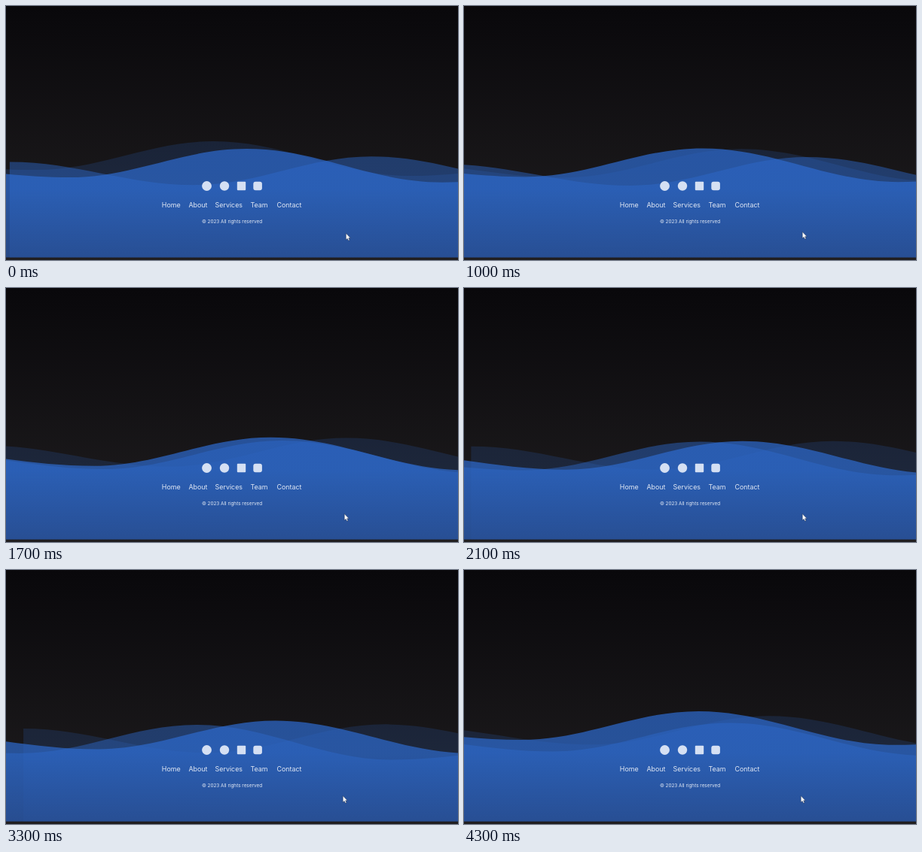
Write an HTML page that moves like this. It is 600x338 px and loops after 4400 ms.

```html
<!DOCTYPE html>
<html lang="en">
<head>
<meta charset="utf-8">
<title>Wave footer</title>
<style>
  html, body { margin: 0; width: 100%; height: 100%; overflow: hidden; background: #141314; }
  svg { display: block; width: 100vw; height: 100vh; }
  text { font-family: Inter, "Open Sans", sans-serif; text-anchor: middle; fill: #e2e9f5; }
  .links { font-size: 8.9px; }
  .note { font-size: 6.4px; }
  .icons { fill: #d5e0f3; }
</style>
</head>
<body>
<svg viewBox="0 0 600 338" preserveAspectRatio="none">
  <defs>
    <linearGradient id="night" x2="0" y2="1">
      <stop stop-color="#09080b"/>
      <stop offset="1" stop-color="#201e20"/>
    </linearGradient>
    <linearGradient id="water" gradientUnits="userSpaceOnUse" x1="0" y1="195" x2="0" y2="334">
      <stop stop-color="#2d6acf"/>
      <stop offset=".35" stop-color="#2d69cb"/>
      <stop offset="1" stop-color="#2956a5"/>
    </linearGradient>
  </defs>
  <rect width="600" height="338" fill="url(#night)"/>
  <g id="waves" fill="url(#water)"></g>
  <g class="icons">
    <circle cx="266.5" cy="239.5" r="6.4"/>
    <circle cx="290" cy="239.5" r="6.2"/>
    <rect x="306.8" y="233.8" width="11.4" height="11.4" rx="1"/>
    <rect x="328.3" y="233.7" width="11.6" height="11.6" rx="3"/>
  </g>
  <g class="links">
    <text x="219.3" y="268.2">Home</text>
    <text x="255" y="268.2">About</text>
    <text x="295.8" y="268.2">Services</text>
    <text x="336" y="268.2">Team</text>
    <text x="376" y="268.2">Contact</text>
  </g>
  <text class="note" x="300" y="289.2">© 2023 All rights reserved</text>
  <path id="cursor" d="M0 0V8.6L2 6.9L3.4 9.8L4.8 9.1L3.5 6.3H6Z" fill="#fff" stroke="#1c2c4c" stroke-width=".5"/>
</svg>
<script>
const LOOP = 4400, STEP = 100, FLOOR = 334.6;

// The crest of each wave swings between two places; "rest" is when it is at the first.
const waves = [
  { alpha: .18, period: 6400, rest: -400, from: [266, 179], to: [518, 207] },
  { alpha: .46, period: 5500, rest: 300, from: [492, 200], to: [248, 206] },
  { alpha: .71, period: 4060, rest: 530, from: [308, 187], to: [378, 206] }
];

const lerp = (a, b, k) => a + (b - a) * k;
const swing = (t, { period, rest }) => (1 - Math.cos(2 * Math.PI * (t - rest) / period)) / 2;

// Crests and troughs around the main crest; the sides rise as it moves right.
function profile(x, y) {
  const shift = x - 275;
  return [
    [x - 480, y + 24 - shift * .08],
    [x - 235, y + 38],
    [x, y],
    [x + 260, y + 46 - shift * .03],
    [x + 520, y + 24]
  ];
}

function wavePath(points) {
  let d = `M${points[0]}`;
  for (let i = 1; i < points.length; i++) {
    const [x0, y0] = points[i - 1], [x1, y1] = points[i];
    const pull = (x1 - x0) * .364;
    d += `C${x0 + pull},${y0} ${x1 - pull},${y1} ${x1},${y1}`;
  }
  return `${d}V${FLOOR}H${points[0][0]}Z`;
}

const group = document.getElementById("waves");
const cursor = document.getElementById("cursor");
for (const wave of waves) {
  wave.node = document.createElementNS(group.namespaceURI, "path");
  wave.node.setAttribute("fill-opacity", wave.alpha);
  group.append(wave.node);
}

function draw(t) {
  for (const wave of waves) {
    const k = swing(t, wave);
    const [x, y] = wave.from.map((start, i) => lerp(start, wave.to[i], k));
    wave.node.setAttribute("d", wavePath(profile(x, y)));
  }
  const settle = Math.min(t / 400, 1);
  const x = lerp(451.3, 449.2, settle) - (t >= 2900 ? 2 : 0);
  cursor.setAttribute("transform", `translate(${x} ${lerp(302.5, 300.5, settle)})`);
}

const start = performance.now();
function tick() {
  const t = (performance.now() - start) % LOOP;
  draw(Math.floor(t / STEP) * STEP);
  requestAnimationFrame(tick);
}
tick();
</script>
</body>
</html>
```
